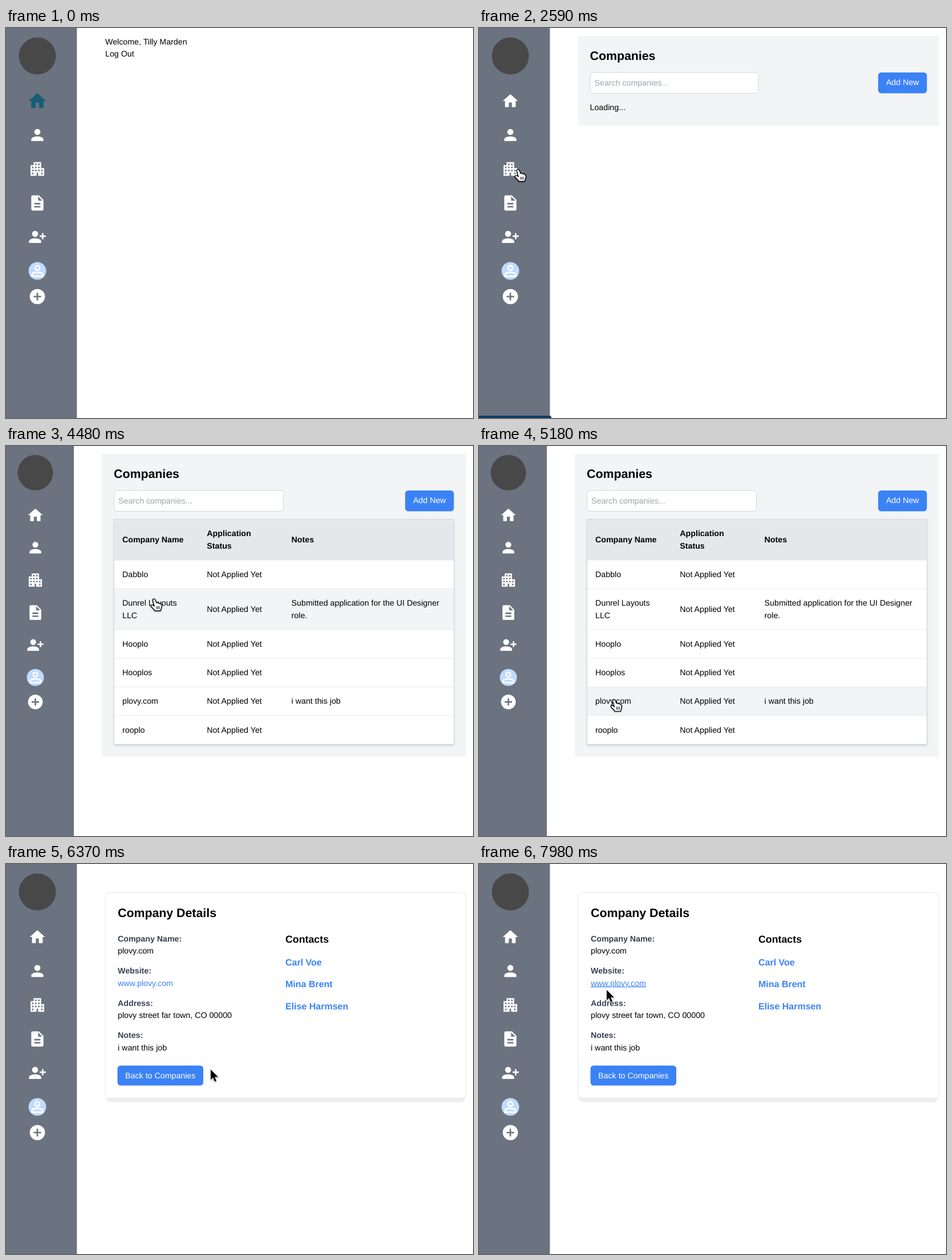
Write an HTML page that moves like this. It is 819 px wide and 684 px high and loops after 8 s.

```html
<!DOCTYPE html>
<html lang="en">
<head>
<meta charset="utf-8">
<title>Company tracker</title>
<style>
html, body { margin: 0; width: 100%; height: 100%; overflow: hidden; background: #fff; }
svg { display: block; font: 14.22px "Liberation Sans", Arial, sans-serif; text-rendering: geometricPrecision; }
text { white-space: pre; }
.b { font-weight: 700; }
.h { font-weight: 700; font-size: 21.33px; }
.white { fill: #fff; }
.hint { fill: #9ca3af; }
.label { font-weight: 700; fill: #374151; }
.link { fill: #3b82f6; }
.contact { font-weight: 700; font-size: 16px; fill: #3b82f6; }
.sub { font-weight: 700; font-size: 17.78px; }
.u { text-decoration: underline; }
</style>
</head>
<body>
<svg id="stage" width="819" height="684" viewBox="0 0 819 684"></svg>
<script>
const LOOP = 8000, STEP = 70, LINE = 21.33;
const GREY = '#6b7280';
const stage = document.getElementById('stage');

// Page changes
const LIST_LOADING = 2310, LIST = 2660, DETAILS_LOADING = 5460, DETAILS = 5600;

// Pointer stops: time, x, y; it eases from one to the next
const STOPS = [
  [700, 404, 672], [1260, 214, 220], [1400, 179, 217], [1540, 185, 222], [1820, 165, 390],
  [2170, 69, 248], [2870, 69, 248], [3150, 108, 343], [3220, 108, 343], [3710, 235, 440],
  [4060, 270, 292], [4270, 262, 222], [4480, 260, 268], [4900, 222, 422], [5250, 239, 447],
  [5950, 239, 447], [6790, 479, 274], [7140, 533, 194], [7630, 373, 170], [7980, 224, 221]
];

const ROWS = [
  { name: ['Dabblo'] },
  { name: ['Dunrel Layouts', 'LLC'], note: ['Submitted application for the UI Designer', 'role.'] },
  { name: ['Hooplo'] },
  { name: ['Hooplos'] },
  { name: ['plovy.com'], note: ['i want this job'] },
  { name: ['rooplo'] }
];
ROWS.reduce((y, r) => {
  r.y = y;
  r.h = 28.9 + LINE * r.name.length;
  return y + r.h;
}, 200.7);

const FIELDS = [
  ['Company Name:', 'plovy.com'], ['Website:', 'www.plovy.com'],
  ['Address:', 'plovy street far town, CO 00000'], ['Notes:', 'i want this job']
];
const CONTACTS = ['Carl Voe', 'Mina Brent', 'Elise Harmsen'];
const LINKS = [[196, 198, 101, 21], ...CONTACTS.map((s, i) => [490, 164 + i * 39, s.length * 8.5, 18])];

const text = (x, y, s, cls = '', more = '') => `<text x="${x}" y="${y}" class="${cls}" ${more}>${s}</text>`;
const rect = (x, y, w, h, fill, more = '') => `<rect x="${x}" y="${y}" width="${w}" height="${h}" fill="${fill}" ${more}/>`;
const circle = (x, y, r, fill, more = '') => `<circle cx="${x}" cy="${y}" r="${r}" fill="${fill}" ${more}/>`;
const shape = (d, more = '') => `<path d="${d}" ${more}/>`;
const line = (d, color, more = '') => shape(d, `fill="none" stroke="${color}" stroke-width="2" ${more}`);
const inside = (p, [x, y, w, h]) => p && p[0] >= x && p[0] <= x + w && p[1] >= y && p[1] <= y + h;
const lines = (x, mid, list, cls) =>
  list.map((s, i) => text(x, mid + 5 + (i - (list.length - 1) / 2) * LINE, s, cls)).join('');
const button = (x, y, w, h, s, base) =>
  rect(x, y, w, h, '#3b82f6', 'rx="5.5"') + text(x + w / 2, base, s, 'white', 'text-anchor="middle"');

// Icons on a 24 unit grid, filled with the colour of their group
const person = x => circle(x, 8, 4, 'inherit') + shape(`M${x - 8} 20v-2c0-5.3 16-5.3 16 0v2z`);
const ICONS = [
  shape('M10 20v-6h4v6h5v-8h3L12 3 2 12h3v8z'),
  person(12),
  shape('M3 21V7h4V3h10v8h4v10h-8v-4h-2v4z')
    + line('M6 9v10M10 5v10M14 5v10M18 13v6', GREY, 'stroke-dasharray="2"'),
  shape('M14 2H6Q4 2 4 4V20Q4 22 6 22H18Q20 22 20 20V8z')
    + line('M8 13h8M8 17h8', GREY) + shape('M13 3.5V9h5.5z', `fill="${GREY}"`),
  person(9) + line('M15 11h8M19 7v8', '#fff'),
  circle(12, 12, 11.6, '#bfdbfe') + circle(12, 8, 3, 'none', 'stroke="#fff" stroke-width="2"')
    + line('M5 19v-2c0-4 14-4 14 0v2z', '#fff'),
  circle(12, 12, 10, 'inherit') + line('M7 12h10M12 7v10', GREY)
];

function pointer(t) {
  const i = STOPS.findIndex(k => k[0] >= t);
  if (i < 1) return i || t < STOPS[0][0] ? null : STOPS[0].slice(1);
  const [t0, x0, y0] = STOPS[i - 1], [t1, x1, y1] = STOPS[i];
  const u = (t - t0) / (t1 - t0), f = u * u * (3 - 2 * u);
  return [x0 + (x1 - x0) * f, y0 + (y1 - y0) * f];
}

// The bar shrinks a little when the table needs the room.
function sidebar(narrow, homeActive) {
  const k = narrow ? 0.955 : 1, x = narrow ? 51.5 : 55;
  const top = narrow ? 121.3 : 128, gap = 59.6 * k;
  let s = rect(0, 0, narrow ? 119 : 124.3, 684, GREY);
  s += circle(x, 49 * k, 32.5 * k, '#484848');
  ICONS.forEach((body, i) => {
    const active = homeActive && i === 0;
    const size = active ? 37 : narrow ? 31 : 32;
    const y = i < 6 ? top + i * gap : top + 5 * gap + 45 * k;
    s += `<g fill="${active ? '#155e75' : '#fff'}" transform="translate(${x} ${y}) scale(${size / 24}) translate(-12 -12)">${body}</g>`;
  });
  return s;
}

function companies(x, loaded, hovered) {
  const left = x + 21.5, right = loaded ? 486.5 : 490;
  let s = rect(x, 14, 807 - x, loaded ? 531 : 157, '#f3f4f6');
  s += text(left - .5, 56, 'Companies', 'h');
  s += rect(left, 78, right - left, 36.5, '#fff', 'rx="5.5" stroke="#d1d5db"');
  s += text(left + 7.5, 101, 'Search companies...', 'hint');
  s += button(700, 78, 85.5, 36.5, 'Add New', 100);
  if (!loaded) return s + text(left - .5, 144, 'Loading...');

  const columns = (mid, cells, cls) => cells.map((c, i) => lines(204 + i * 148.3, mid, c, cls)).join('');
  s += rect(190, 129, 595, 394, '#fff', 'style="filter:drop-shadow(0 2px 2px rgba(0,0,0,.2))"');
  s += rect(190, 129, 595, 72, '#e5e7eb');
  s += columns(164, [['Company Name'], ['Application', 'Status'], ['Notes']], 'b');
  for (const r of ROWS) {
    s += rect(190, r.y, 595, r.h, r === hovered ? '#f3f4f6' : '#fff');
    s += rect(190, r.y + r.h - 1, 595, 1, '#e5e7eb');
    s += columns(r.y + r.h / 2 - .6, [r.name, ['Not Applied Yet'], r.note || []]);
  }
  return s + rect(189.5, 128.5, 596, 395, 'none', 'stroke="#d5d8dd"');
}

function details(over) {
  const mark = i => over === i ? ' u' : '';
  let s = rect(175, 60, 630, 358, '#eee', 'rx="8" style="filter:blur(1px)"');
  s += rect(174, 50, 632.5, 360.5, '#fff', 'rx="7" stroke="#e5e7eb"');
  s += text(196, 92.5, 'Company Details', 'h');
  FIELDS.forEach(([label, value], i) => {
    const y = 136 + i * 56.4;
    s += text(196, y, label, 'label') + text(196, y + LINE, value, i === 1 ? 'link' + mark(0) : '');
  });
  s += button(195.5, 353.5, 150.5, 35, 'Back to Companies', 376);
  s += text(490, 138, 'Contacts', 'sub');
  CONTACTS.forEach((name, i) => { s += text(490, 177.5 + i * 38.9, name, 'contact' + mark(i + 1)); });
  return s;
}

function cursor([x, y], hand) {
  const body = hand
    ? shape('M-3 2C-3 0 1-1 2 2L4 7Q7 6 8 8Q10 7 11 9Q13 9 13 11C14 15 12 17 11 21H1C0 18-4 16-6 13C-6 11-4 10-2 11L0 13z',
        'fill="#fff" stroke="#000" stroke-width="1.4" stroke-linejoin="round"')
      + shape('M4 13v5M6.500 13v5M9 13v5', 'stroke="#000"')
    : shape('M0 0V18L4 14L7 21L10 20L7 13H13z', 'stroke="#fff" stroke-width="1.6" paint-order="stroke"');
  return `<g transform="translate(${x} ${y})" style="filter:drop-shadow(0 1px 1px rgba(0,0,0,.35))">${body}</g>`;
}

function draw(t) {
  const p = pointer(t);
  const listed = t >= LIST && t < DETAILS_LOADING;
  let s = sidebar(listed, t < LIST_LOADING);
  let hand = inside(p, [30, 100, 50, 390]);

  if (t < LIST_LOADING) {
    s += text(174, 29, 'Welcome, Tilly Marden') + text(174, 50, 'Log Out');
  } else if (t < DETAILS_LOADING) {
    const row = listed && ROWS.find(r => inside(p, [190, r.y, 595, r.h]));
    s += companies(listed ? 168 : 173.5, listed, row);
    hand = hand || !!row;
  } else if (t < DETAILS) {
    s += text(490, 64.5, 'Loading company details...', '', 'text-anchor="middle"');
  } else {
    // The underline trails the pointer by one step.
    const before = pointer(t - STEP);
    s += details(LINKS.findIndex(l => inside(before, l)));
    hand = LINKS.some(l => inside(p, l));
  }

  if (t >= 2450 && t < 3500) s += shape('M0 680H124Q127 680 127 684H0z', 'fill="#113b67"');
  if (p) s += cursor(p, hand);
  stage.innerHTML = s;
}

let shown = -1;
function tick() {
  const t = Math.floor(performance.now() % LOOP / STEP) * STEP;
  if (t !== shown) draw(shown = t);
  requestAnimationFrame(tick);
}
tick();
</script>
</body>
</html>
```
